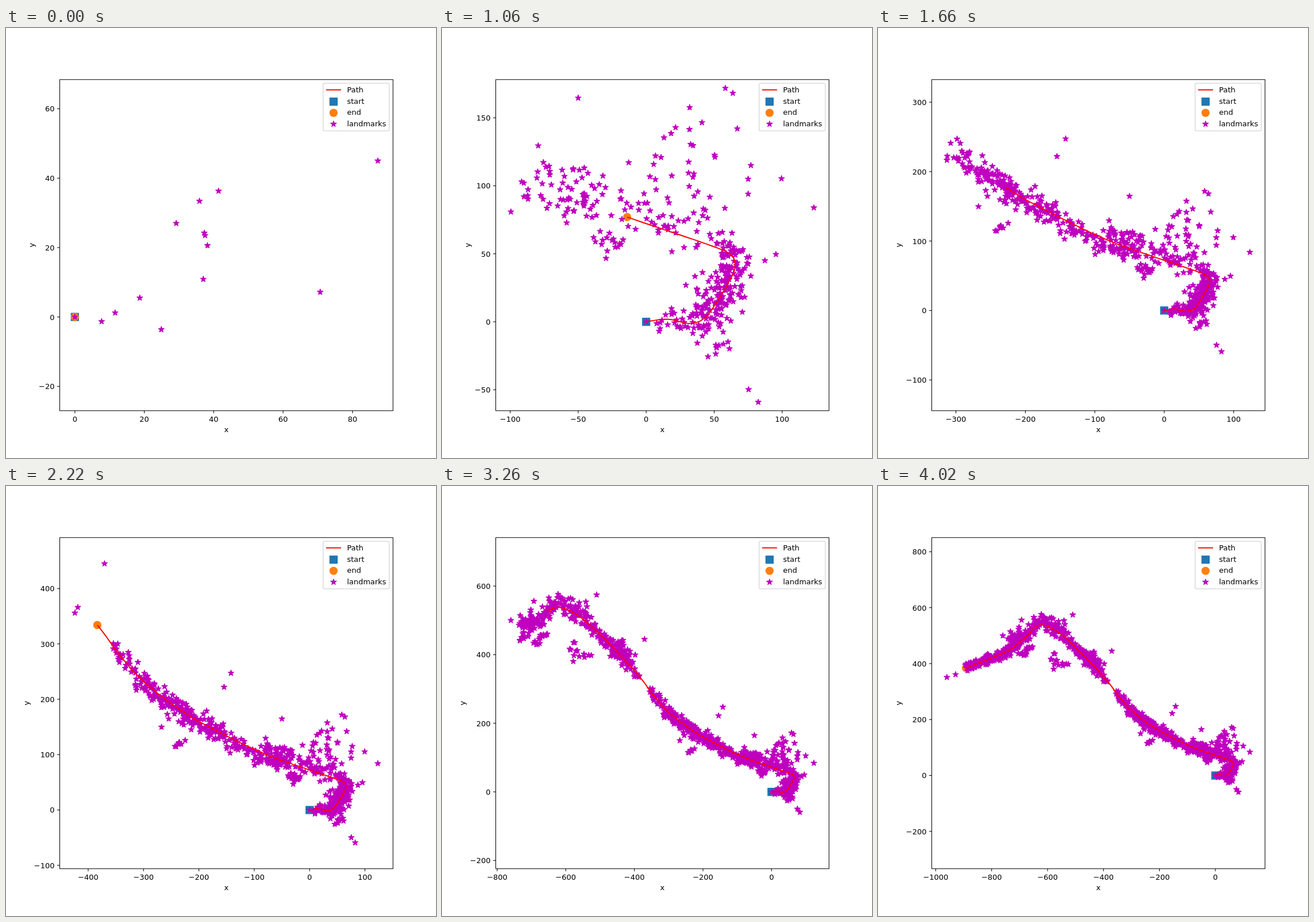
Animation, 748 px wide and 748 px high, one loop 4040 ms. Source, as an HTML page with a canvas:

```html
<!DOCTYPE html>
<html lang="en">
<head>
<meta charset="utf-8">
<title>Path and landmarks</title>
<style>
html, body { margin: 0; width: 100%; height: 100%; overflow: hidden; background: #fff; }
canvas { display: block; }
</style>
</head>
<body>
<canvas id="plot" width="748" height="748"></canvas>
<script>
const ctx = document.getElementById('plot').getContext('2d');
const SIZE = 748, STEP = 20, FRAMES = 202;
const PT = 0.935 * 100 / 72;          // one point in pixels
const FONT = 10 * PT;
const L = 93.5, R = 673.2, T = 89.76, B = 665.72;
const W = R - L, H = B - T;

// --- random numbers ---
let seed = 20;
function rnd() {
  seed = (seed + 0x6D2B79F5) | 0;
  let t = Math.imul(seed ^ (seed >>> 15), 1 | seed);
  t = (t + Math.imul(t ^ (t >>> 7), 61 | t)) ^ t;
  return ((t ^ (t >>> 14)) >>> 0) / 4294967296;
}
const bell = () => (rnd() + rnd() + rnd() - 1.5) * 2;

// --- route ---
const way = [
  [0, 0], [16, 1.9], [33, -1.2], [45.4, 5.4], [62, 31.5], [65.4, 42], [61.2, 50], [44, 57.3],
  [-14, 77], [-81, 101], [-164, 141], [-228, 177], [-294, 227], [-341, 277], [-383.5, 334],
  [-457, 415], [-541, 496], [-600, 533], [-640, 534], [-676, 498], [-744, 445], [-892, 384]
];
// waypoint position reached at a step
const marks = [[0, 0], [4, 25], [8, 53], [11, 83], [14, 111], [18.35, 163], [21, 201]];

function spline(a, b, c, d, t) {
  return 0.5 * (2 * b + (c - a) * t + (2 * a - 5 * b + 4 * c - d) * t * t +
    (3 * b - a - 3 * c + d) * t * t * t);
}

function buildRoute() {
  const SUB = 20, fine = [[0, 0, 0]];
  const at = i => way[Math.max(0, Math.min(way.length - 1, i))];
  for (let i = 0; i < way.length - 1; i++) {
    for (let k = 1; k <= SUB; k++) {
      const [x, y] = [0, 1].map(c =>
        spline(at(i - 1)[c], at(i)[c], at(i + 1)[c], at(i + 2)[c], k / SUB));
      const q = fine[fine.length - 1];
      fine.push([x, y, q[2] + Math.hypot(x - q[0], y - q[1])]);
    }
  }
  const n = marks.length;
  const time = marks.map(m => m[1]), dist = marks.map(m => fine[Math.round(m[0] * SUB)][2]);
  const speed = i => (dist[i + 1] - dist[i]) / (time[i + 1] - time[i]);
  const slope = marks.map((m, i) => {
    const u = speed(Math.max(0, i - 1)), v = speed(Math.min(n - 2, i));
    return 2 * u * v / (u + v);
  });
  const out = [];
  let seg = 0, j = 0;
  for (let f = 0; f < FRAMES; f++) {
    while (seg < n - 2 && f > time[seg + 1]) seg++;
    const h = time[seg + 1] - time[seg], t = (f - time[seg]) / h, t2 = t * t, t3 = t2 * t;
    const s = (2 * t3 - 3 * t2 + 1) * dist[seg] + (t3 - 2 * t2 + t) * h * slope[seg] +
      (3 * t2 - 2 * t3) * dist[seg + 1] + (t3 - t2) * h * slope[seg + 1];
    while (j < fine.length - 2 && fine[j + 1][2] < s) j++;
    const a = fine[j], b = fine[j + 1], k = (s - a[2]) / (b[2] - a[2]);
    out.push([a[0] + (b[0] - a[0]) * k, a[1] + (b[1] - a[1]) * k]);
  }
  return out;
}
const route = buildRoute();

// --- landmarks ---
const stars = [];

function nearest(x, y) {
  const d = route.map(p => Math.hypot(p[0] - x, p[1] - y));
  return d.indexOf(Math.min(...d));
}

// lone landmarks, all visible by the given step
function singles(by, spots) {
  for (const [x, y] of spots) {
    const born = Math.min(nearest(x, y) - 4 - 12 * rnd(), by - 12 * rnd());
    stars.push({ x, y, born: by ? Math.max(1, Math.floor(born)) : 0 });
  }
}

// a cloud around a stretch of the route, raised by lift, seen ahead of time
function cloud(from, to, count, spread, lift = 0, lead = 0) {
  for (let i = 0; i < count; i++) {
    const f = Math.round(from + (to - from) * rnd());
    const x = route[f][0] + spread * bell(), y = route[f][1] + lift + spread * bell();
    let born = Math.max(1, Math.floor(f - lead - 4 - 12 * rnd()));
    while (born < FRAMES && x < route[born][0] - 85) born++;
    stars.push({ x, y, born });
  }
}

singles(0, [
  [0, 0], [7.7, -1.3], [11.6, 1.2], [18.7, 5.5], [24.9, -3.6], [29.2, 27], [35.9, 33.4],
  [41.4, 36.3], [37.3, 24.2], [37.5, 23.5], [38.2, 20.6], [37, 10.9], [70.7, 7.2], [87.3, 45]
]);
singles(25, [
  [50.3, 122.6], [75, 105], [99.5, 105.3], [75, 94], [42, 83], [123.3, 83.9],
  [95.4, 49.6], [75.3, -49.8], [82.4, -59.1]
]);
singles(53, [
  [58.2, 171.8], [63.7, 168.2], [67, 142], [77, 115], [-50, 164.6], [-79.4, 129.5], [-99.5, 80.9]
]);
singles(83, [[-142, 247.3], [-154.5, 222], [-313, 216.6], [-262, 223]]);
singles(111, [[-370.5, 445], [-418.7, 366], [-424, 356]]);
singles(163, [[-510, 574.5], [-693, 556], [-760, 500]]);
singles(201, [[-960, 351], [-929, 361]]);

cloud(3, 14, 26, 4);
cloud(14, 22, 85, 7.5);
cloud(18, 20, 10, 6, -30);
cloud(22, 34, 85, 6.5);
cloud(38, 52, 46, 12, 12);
cloud(41, 47, 26, 17, 55);
cloud(54, 57, 22, 7, -18);
cloud(58, 63, 78, 10, 4);
cloud(64, 73, 48, 7, -8);
cloud(73, 83, 95, 9);
cloud(82, 86, 9, 9, -55);
cloud(83, 97, 110, 8, -2);
cloud(98, 104, 24, 7, 2);
cloud(112, 118, 13, 6, 0, -14);
cloud(119, 128, 88, 13, 10, -14);
cloud(129, 142, 48, 9, 0, -8);
cloud(143, 162, 88, 14, 8);
cloud(143, 154, 13, 15, -105);
cloud(172, 178, 32, 13, 30, 14);
cloud(164, 186, 120, 8);
cloud(166, 171, 18, 9, -52);
cloud(184, 201, 105, 7);

// --- equal-aspect view around everything drawn so far ---
function viewAt(f) {
  const pts = stars.filter(s => s.born <= f).map(s => [s.x, s.y]).concat(route.slice(0, f + 1));
  const span = c => {
    const v = pts.map(p => p[c]), lo = Math.min(...v), hi = Math.max(...v);
    return { mid: (lo + hi) / 2, data: hi - lo, size: (hi - lo) * 1.1 };
  };
  const x = span(0), y = span(1), ratio = H / W;
  const ySize = ratio * x.size, xSize = y.size / ratio, grow = ySize / y.size - 1;
  if (Math.abs(grow) >= 0.005) {
    const fitY = ySize > 1.05 * y.data, fitX = xSize > 1.05 * x.data;
    if ((fitY && grow < 0) || (!fitX && grow > 0)) y.size = ySize;
    else x.size = xSize;
  }
  return {
    x, y,
    px: v => L + W / 2 + (v - x.mid) * W / x.size,
    py: v => T + H / 2 - (v - y.mid) * H / y.size
  };
}

function ticks({ mid, size }) {
  const raw = size / 9, base = 10 ** Math.floor(Math.log10(raw));
  const step = [1, 2, 2.5, 5, 10].map(k => k * base).find(s => s >= raw);
  const out = [];
  for (let i = Math.ceil((mid - size / 2) / step); i * step <= mid + size / 2; i++) out.push(i * step);
  return out;
}

// --- drawing ---
function text(str, x, y, align) {
  ctx.textAlign = align;
  ctx.fillText(str, x, y);
}

function line(color, width, pts) {
  ctx.strokeStyle = color;
  ctx.lineWidth = width;
  ctx.beginPath();
  pts.forEach(p => ctx.lineTo(p[0], p[1]));
  ctx.stroke();
}

function marker(kind, x, y) {
  const r = 5 * PT;
  ctx.lineWidth = PT;
  ctx.beginPath();
  if (kind === 'square') {
    ctx.rect(x - r, y - r, 2 * r, 2 * r);
    ctx.fillStyle = '#1f77b4';
  } else if (kind === 'circle') {
    ctx.arc(x, y, r, 0, 2 * Math.PI);
    ctx.fillStyle = '#ff7f0e';
  } else {
    for (let i = 0; i < 10; i++) {
      const q = 4 * PT * (i % 2 ? 0.382 : 1), a = i * Math.PI / 5;
      ctx.lineTo(x + q * Math.sin(a), y - q * Math.cos(a));
    }
    ctx.closePath();
    ctx.fillStyle = '#bf00bf';
  }
  ctx.strokeStyle = ctx.fillStyle;
  ctx.fill();
  ctx.stroke();
}

function drawAxes(view) {
  const name = v => String(v).replace('-', '\u2212');
  const len = 3.5 * PT, thin = 0.8 * PT;
  let wide = 0;
  ctx.fillStyle = '#000';
  for (const v of ticks(view.x)) {
    const x = view.px(v);
    line('#000', thin, [[x, B], [x, B + len]]);
    text(name(v), x, B + 19, 'center');
  }
  for (const v of ticks(view.y)) {
    const y = view.py(v);
    line('#000', thin, [[L, y], [L - len, y]]);
    text(name(v), L - 2 * len, y + 4.9, 'right');
    wide = Math.max(wide, ctx.measureText(name(v)).width);
  }
  ctx.lineWidth = thin;
  ctx.strokeRect(L, T, W, H);
  text('x', L + W / 2, B + 37, 'center');
  ctx.save();
  ctx.translate(L - 2 * len - wide - 8.3, T + H / 2);
  ctx.rotate(-Math.PI / 2);
  text('y', 0, 0, 'center');
  ctx.restore();
}

function drawLegend() {
  ctx.beginPath();
  ctx.roundRect(551.6, 96.2, 115.1, 82.7, 2.6);
  ctx.fillStyle = 'rgba(255,255,255,0.8)';
  ctx.fill();
  ctx.strokeStyle = 'rgba(204,204,204,0.8)';
  ctx.lineWidth = PT;
  ctx.stroke();
  line('#f00', 1.5 * PT, [[556.8, 107.6], [582.8, 107.6]]);
  ['square', 'circle', 'star'].forEach((kind, i) => marker(kind, 569.8, 128.1 + 19.5 * i));
  ctx.fillStyle = '#000';
  ['Path', 'start', 'end', 'landmarks'].forEach((s, i) => text(s, 593.2, 112 + 19.5 * i, 'left'));
}

function draw(f) {
  const view = viewAt(f), spot = p => [view.px(p[0]), view.py(p[1])];
  ctx.fillStyle = '#fff';
  ctx.fillRect(0, 0, SIZE, SIZE);
  ctx.font = FONT + 'px "DejaVu Sans", sans-serif';
  ctx.lineJoin = 'round';
  ctx.save();
  ctx.beginPath();
  ctx.rect(L, T, W, H);
  ctx.clip();
  marker('square', ...spot(route[0]));
  marker('circle', ...spot(route[f]));
  for (const s of stars) if (s.born <= f) marker('star', ...spot([s.x, s.y]));
  line('#f00', 1.5 * PT, route.slice(0, f + 1).map(spot));
  ctx.restore();
  drawAxes(view);
  drawLegend();
}

const start = performance.now();
let shown = -1;
function tick() {
  const f = Math.floor((performance.now() - start) / STEP) % FRAMES;
  if (f !== shown) draw(shown = f);
  requestAnimationFrame(tick);
}
tick();
</script>
</body>
</html>
```
